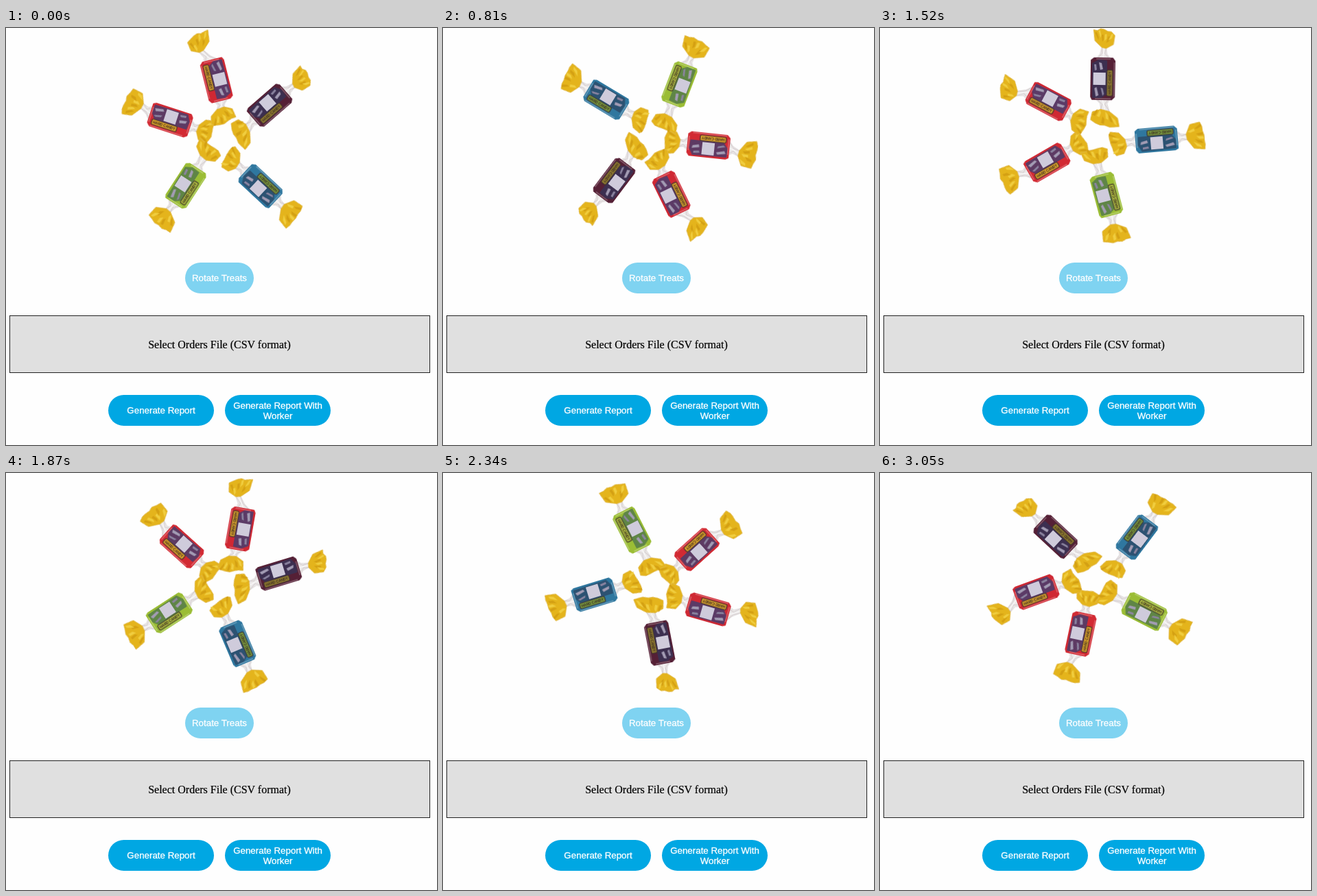
Recreate the animation shown at these times as an HTML page. Size 628 by 608 pixels, loop 3150 ms.

```html
<!DOCTYPE html>
<html lang="en">
<head>
<meta charset="utf-8">
<title>Order report</title>
<style>
  html, body { margin: 0; width: 100%; height: 100%; overflow: hidden; background: #fefefe; }
  #stage { position: relative; width: 628px; height: 608px; overflow: hidden; }
  #wheel { position: absolute; left: 0; top: 0; }
  .btn, .drop { position: absolute; box-sizing: border-box; display: flex; align-items: center; justify-content: center; text-align: center; }
  .btn {
    height: 45px; border-radius: 22.5px; background: #00a7e3; color: #fff;
    font: 13.333px/15px "Liberation Sans", Arial, sans-serif; -webkit-text-stroke: .3px #fff;
  }
  .drop {
    left: 5px; top: 419px; width: 613px; height: 84px; padding: 1px 1px 0 0;
    border: 1px solid #222; background: #e0e0e0; color: #000;
    font: 16px/18px "Liberation Serif", Times, serif; -webkit-text-stroke: .2px #000;
  }
</style>
</head>
<body>
<div id="stage">
  <svg id="wheel" width="628" height="360" viewBox="0 0 628 360">
    <g transform="translate(311 160.5)"><g id="spin"></g></g>
  </svg>
  <div class="btn" style="left:261px;top:342px;width:100px;opacity:.5">Rotate Treats</div>
  <div class="drop">Select Orders File (CSV format)</div>
  <div class="btn" style="left:149px;top:535px;width:154px">Generate Report</div>
  <div class="btn" style="left:319px;top:535px;width:154px">Generate Report With<br>Worker</div>
</div>
<script>
const spin = document.getElementById('spin');

// Wrapper ends: [distance from body, sideways offset, width, skew]
const candies = [
  { at: 200, r: 76.5, axis: 198, body: '#d22a33', dark: '#5d3a63', label: '#d9a02a',
    outer: [58, 7, 40, -3], inner: [53, 1, 35, 1] },
  { at: 267, r: 84.5, axis: 256, body: '#cf2833', dark: '#5b3a66', label: '#d09a2e',
    outer: [59, -11, 33, 4], inner: [52, -4, 37, -2] },
  { at: 327, r: 87.5, axis: 319, body: '#552036', dark: '#3c2f50', label: '#8f7a30', flip: true,
    outer: [58, 1, 31, -3], inner: [57, 4, 42, 5] },
  { at: 49.3, r: 92, axis: 43, body: '#2f779f', dark: '#2c5272', label: '#76963f',
    outer: [57, 0, 40, 2], inner: [56, 1, 35, -3] },
  { at: 125.1, r: 85, axis: 123, body: '#9bbd35', dark: '#5f8546', label: '#a9b640',
    outer: [57, 2, 40, -2], inner: [59, 1, 39, 2] }
];

let seed = 11;
const rand = () => (seed = (seed * 16807) % 2147483647) / 2147483647;

function add(parent, tag, attrs, text) {
  const el = document.createElementNS('http://www.w3.org/2000/svg', tag);
  for (const k in attrs) el.setAttribute(k, attrs[k]);
  if (text) el.textContent = text;
  return parent.appendChild(el);
}

const path = pts => 'M' + pts.map(p => p.map(n => n.toFixed(1)).join(' ')).join('L');

function shape(parent, pts, fill, stroke = fill, width = 1) {
  return add(parent, 'path', { d: path(pts) + 'Z', fill, stroke, 'stroke-width': width, 'stroke-linejoin': 'round' });
}

// One twisted end: clear film, a crumpled yellow fan and its folds.
function twist(parent, [mid, off, width, skew], inner) {
  const g = add(parent, 'g', { transform: `scale(${inner ? -1 : 1} 1)` });
  const half = inner ? 11 : 13;
  const neck = inner ? .3 : .2;
  const pinch = off * .4;
  const at = (x, k) => [mid + x + skew * k, off + k * width / 2];
  const edge = [];
  for (let i = 0; i <= 6; i++) {
    const k = i / 3 - 1;
    edge.push(at(half - 3 * k * k + (rand() - .5) * 3, k));
  }
  const near = at(-half, -neck), far = at(-half, neck);

  shape(g, [[28, -12], [36, pinch - 5], near, at(-3, -.9), at(-3, .9), far, [36, pinch + 5], [28, 12]], '#ece9e9', '#ddd8d9');
  for (const k of [-1, 0, 1])
    add(g, 'path', { d: path([[29, k * 9], [37, pinch + k * 2], at(-half, k * neck)]), fill: 'none', stroke: k ? '#d0c8ca' : '#fff', 'stroke-width': 1 });

  shape(g, [near, at(-half * .4, -.88), ...edge, at(-half * .4, .88), far], '#e4b41c', '#e0b640');
  for (let i = 0; i < 6; i++) {
    const k = (i - 2.5) / 3.2, x = (rand() - .6) * half;
    shape(g, [at(x - 4, k * .6 - .08), at(x + 6, k - .1), at(x + 7, k + .08), at(x, k * .8 + .1)], i % 2 ? '#f0cd3f' : '#d4a013', 'none');
  }
}

function candy(c) {
  const a = c.at * Math.PI / 180;
  const g = add(spin, 'g', {
    transform: `translate(${(c.r * Math.cos(a)).toFixed(2)} ${(c.r * Math.sin(a)).toFixed(2)}) rotate(${c.axis})`
  });
  twist(g, c.outer, false);
  twist(g, c.inner, true);

  const b = add(g, 'g', { transform: `rotate(${c.flip ? 0 : 180})` });
  shape(b, [[-30, -15], [-26, -17], [27, -17], [30, -13], [30, 14], [26, 17], [-26, 17], [-30, 13]], c.body, c.body, 2);
  shape(b, [[-27, -14], [22, -15], [27, -6], [26, 5], [-22, 5], [-27, -2]], c.dark, c.dark, 2);
  add(b, 'rect', { x: -9, y: -14, width: 18, height: 18, fill: '#cfcbdb' });

  // Gloss on the wrapper
  shape(b, [[-26, -10], [-14, -12], [-12, -9], [-24, -6]], '#a39cb4', 'none');
  shape(b, [[13, -4], [24, -6], [23, -2], [14, 0]], '#a39cb4', 'none');
  shape(b, [[-25, 0], [-13, -3], [-14, 0], [-22, 2]], '#8b84a0', 'none');
  shape(b, [[12, -12], [21, -13], [21, -10], [13, -9]], '#8b84a0', 'none');

  add(b, 'rect', { x: -25, y: 6, width: 38, height: 8, rx: 1.5, fill: c.label, stroke: '#3d302c', 'stroke-width': 1.2 });
  add(b, 'text', {
    x: -6, y: 11.8, 'text-anchor': 'middle', fill: '#3a2b20',
    style: 'font: bold 5px "Liberation Sans", Arial, sans-serif'
  }, 'HARD CANDY');
  add(b, 'path', { d: 'M-26 16.5H24M-29 -11V12M29 -10V11', fill: 'none', stroke: '#fff', 'stroke-opacity': .3, 'stroke-width': 1.4 });
}

candies.forEach(candy);

// The wheel ticks 12 degrees at a time; a few ticks are shorter.
const loop = 3150, ticks = 53, turn = 12;
const short = new Set([0, 7, 12, 17, 28, 37, 43]);
const steps = [];
for (let i = 0, t = 0; i < ticks; i++) {
  steps.push({ offset: Math.max(0, t - .5) / loop, transform: `rotate(${i * turn}deg)`, easing: 'step-end' });
  t += short.has(i) ? 50 : 60;
}
steps.push({ offset: 1, transform: `rotate(${(ticks - 1) * turn}deg)` });
spin.animate(steps, { duration: loop, iterations: Infinity });
</script>
</body>
</html>
```
